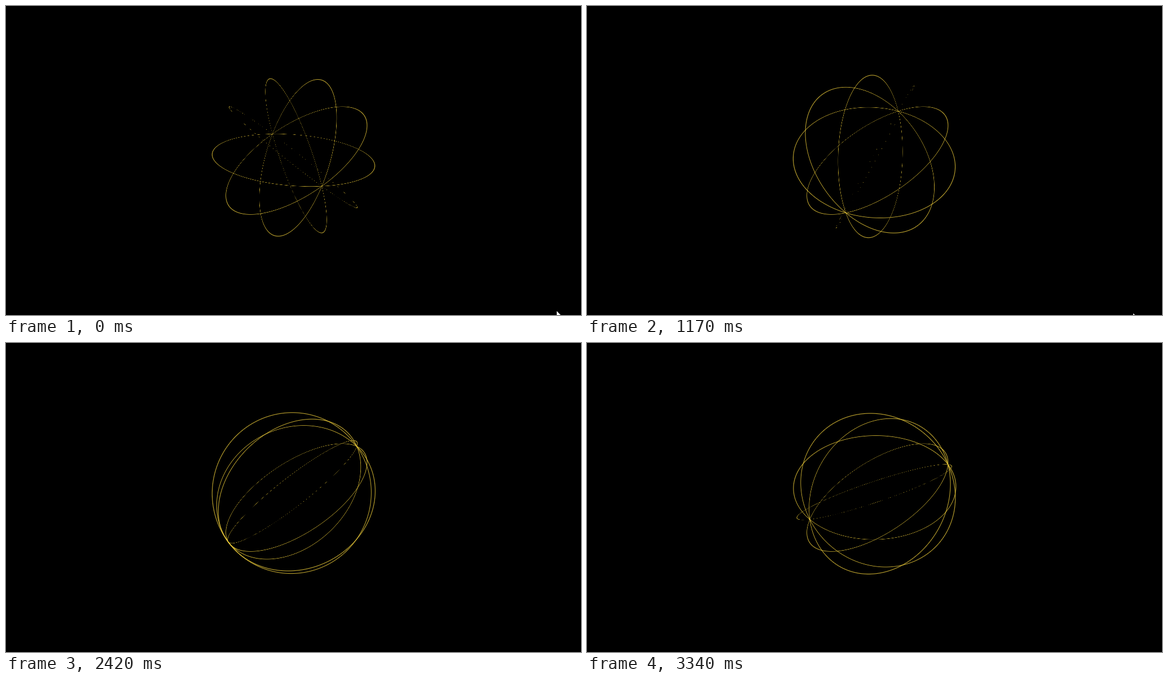
These frames come from a looping animation (1019x549 px, 3.38 s). An HTML page with a canvas:

```html
<!DOCTYPE html>
<html lang="en">
<head>
<meta charset="utf-8">
<title>Rotating rings</title>
<style>
  html, body { margin: 0; width: 100%; height: 100%; overflow: hidden; background: #000; }
  canvas { display: block; }
</style>
</head>
<body>
<canvas id="stage" width="1019" height="549"></canvas>
<script>
const ctx = document.getElementById('stage').getContext('2d');
const LOOP = 3380;
const STEP = 40;
const STEP_TIME = LOOP / 84;
const CX = 510, CY = 267.5;
const RADIUS = 143, DEPTH = 953;
const RINGS = 5;
const COLOR = [250, 215, 60];
const PEAK = 0.78, HALF_WIDTH = 1.05;
const BOX = { x: 358, y: 117, w: 304, h: 304 };
const rad = deg => deg * Math.PI / 180;

// Axes of the globe after rotateX(60deg) rotateY(-30deg); y points down, z to the viewer.
const axisX = [0.8660, -0.4330, 0.25];
const axisY = [0, 0.5, 0.8660];
const axisZ = [-0.5, -0.75, 0.4330];

const image = ctx.createImageData(BOX.w, BOX.h);
const cover = new Float32Array(BOX.w * BOX.h);

const mix = (a, b, angle) =>
  a.map((v, i) => v * Math.cos(angle) + b[i] * Math.sin(angle));

// Casts a ray through each pixel centre onto the ring's plane and samples its thin, soft border.
function addRing([nx, ny, nz]) {
  const inner = (RADIUS - HALF_WIDTH) ** 2, outer = (RADIUS + HALF_WIDTH) ** 2;
  const nd = nz * DEPTH;
  for (let j = 0, p = 0; j < BOX.h; j++) {
    const y = BOX.y + j + 0.5 - CY;
    for (let i = 0; i < BOX.w; i++, p++) {
      const x = BOX.x + i + 0.5 - CX;
      const s = nd / (nd - nx * x - ny * y);
      const z = DEPTH * (1 - s);
      const r2 = s * s * (x * x + y * y) + z * z;
      if (s <= 0 || r2 < inner || r2 > outer) continue;
      const a = PEAK * (1 - Math.abs(Math.sqrt(r2) - RADIUS) / HALF_WIDTH);
      cover[p] += a * (1 - cover[p]);
    }
  }
}

function drawRings(time) {
  cover.fill(0);
  const side = mix(axisX, axisY, rad(time * 0.036 - 20.3));
  for (let k = 0; k < RINGS; k++) addRing(mix(axisZ, side, rad(k * 180 / RINGS)));
  for (let p = 0; p < cover.length; p++) {
    for (let c = 0; c < 3; c++) image.data[p * 4 + c] = COLOR[c] * cover[p];
    image.data[p * 4 + 3] = 255;
  }
  ctx.putImageData(image, BOX.x, BOX.y);
}

// Pointer path: time, x, y of the tip.
const path = [
  [0, 976, 542], [300, 974, 543], [600, 971, 545], [770, 969, 546],
  [1170, 968, 546], [1400, 968, 547], [1500, 968, 550]
];

function drawPointer(time) {
  const i = path.findIndex(key => key[0] > time);
  if (i < 0) return;
  const [t0, x0, y0] = path[i - 1], [t1, x1, y1] = path[i];
  const f = (time - t0) / (t1 - t0);
  const x = Math.round(x0 + (x1 - x0) * f);
  const y = Math.round(y0 + (y1 - y0) * f);
  ctx.fillStyle = '#fff';
  ctx.beginPath();
  ctx.moveTo(x, y);
  ctx.lineTo(x, y + 16);
  ctx.lineTo(x + 4, y + 12);
  ctx.lineTo(x + 11, y + 11);
  ctx.fill();
}

let shown = -1;

function draw() {
  const t = performance.now() % LOOP;
  // Two steps of the loop last 10 ms longer than the others.
  const step = Math.floor((t - (t >= 690 ? 10 : 0) - (t >= 2260 ? 10 : 0)) / STEP);
  if (step !== shown) {
    shown = step;
    const time = step * STEP_TIME;
    ctx.fillStyle = '#000';
    ctx.fillRect(0, 0, 1019, 549);
    drawRings(time);
    drawPointer(time);
  }
  requestAnimationFrame(draw);
}
draw();
</script>
</body>
</html>
```
